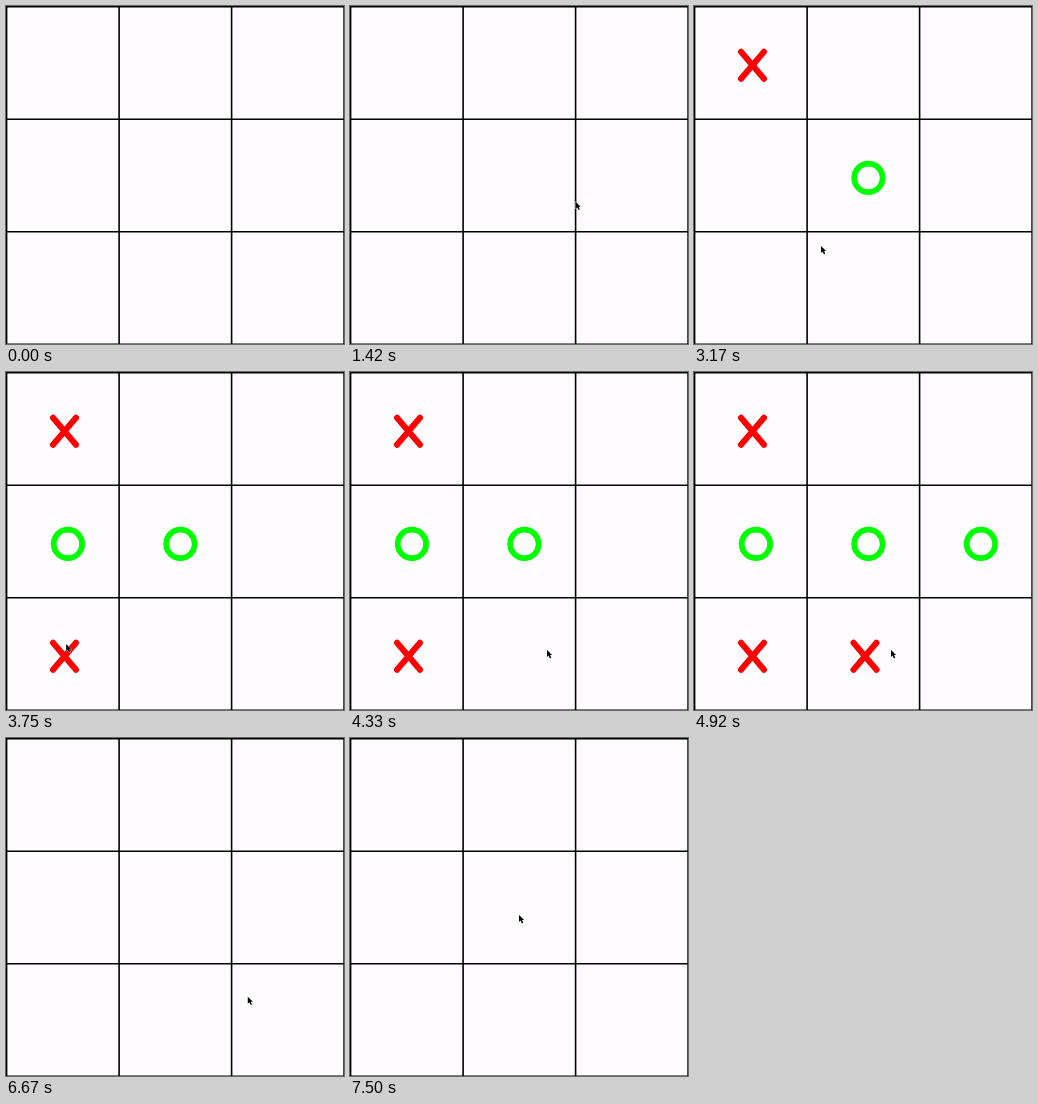
These frames come from a looping animation (338x338 px, 8 s). An HTML page:

```html
<!DOCTYPE html>
<html lang="en">
<head>
<meta charset="utf-8">
<title>Tic-tac-toe</title>
<style>
  html, body { margin: 0; width: 100%; height: 100%; overflow: hidden; background: #fefcff; }
  svg { display: block; width: 338px; height: 338px; }
  .mark { fill: none; stroke-linecap: round; }
</style>
</head>
<body>
<svg viewBox="0 0 338 338">
  <path id="grid" stroke="#000" stroke-width="1.6"/>
  <g id="marks"></g>
  <path id="cursor" d="M0 0V7L1.6 5.6L2.9 8.4L4.2 7.8L3.1 5.1H5.1Z"
        stroke="#fff" stroke-width=".7" paint-order="stroke"/>
</svg>
<script>
const FPS = 12, STEPS = 96, CELL = 112.5, CLEAR = 75;

// Each round: step, cell of the X, cell of the O (cells count row by row)
const rounds = [[30, 0, 4], [43, 6, 3], [54, 7, 5]];

// Pointer: where it enters, then its strokes as from step, to step, x, y
const entry = { x: 253, y: 217 };
const strokes = [
  [15, 21, 68, 73],
  [32, 38, 127, 240], [38, 41, 57, 272],
  [44, 50, 229, 277], [50, 52, 197, 278],
  [66, 71, 245, 261],
  [78, 87, 172, 207], [87, 90, 169, 177]
];

const byId = id => document.getElementById(id);
const cursor = byId('cursor'), marks = byId('marks');

byId('grid').setAttribute('d', [0, 1, 2, 3].map(i => {
  const p = 0.6 + i * CELL;
  return `M${p} 0V338M0 ${p + 0.2}H338`;
}).join(''));

const corner = cell => [cell % 3 * CELL, Math.floor(cell / 3) * CELL];

function cross(cell) {
  const [x, y] = corner(cell);
  return `<path class="mark" stroke="#f00" stroke-width="6"
    d="M${x + 47} ${y + 45.7}l23 27m0-27l-23 27"/>`;
}

function ring(cell) {
  const [x, y] = corner(cell);
  return `<circle class="mark" stroke="#0f0" stroke-width="5.8"
    cx="${x + 61.9}" cy="${y + 59.4}" r="14.2"/>`;
}

marks.innerHTML = rounds.map(([, x, o]) => `<g>${cross(x)}${ring(o)}</g>`).join('');

const show = (el, on) => el.setAttribute('visibility', on ? 'visible' : 'hidden');
const ease = t => t < 0.5 ? 4 * t ** 3 : 1 - 4 * (1 - t) ** 3;

function pointerAt(step) {
  let { x, y } = entry;
  for (const [from, to, toX, toY] of strokes) {
    const k = ease(Math.min(1, Math.max(0, (step - from) / (to - from))));
    x += (toX - x) * k;
    y += (toY - y) * k;
  }
  return [x, y];
}

function draw(now) {
  const step = Math.floor((now + 4) * FPS / 1000) % STEPS;
  rounds.forEach(([from], i) => show(marks.children[i], step >= from && step < CLEAR));
  show(cursor, step >= strokes[0][0]);
  cursor.setAttribute('transform', `translate(${pointerAt(step)})`);
}

const start = performance.now();
function tick() {
  draw(performance.now() - start);
  requestAnimationFrame(tick);
}
tick();
</script>
</body>
</html>
```
